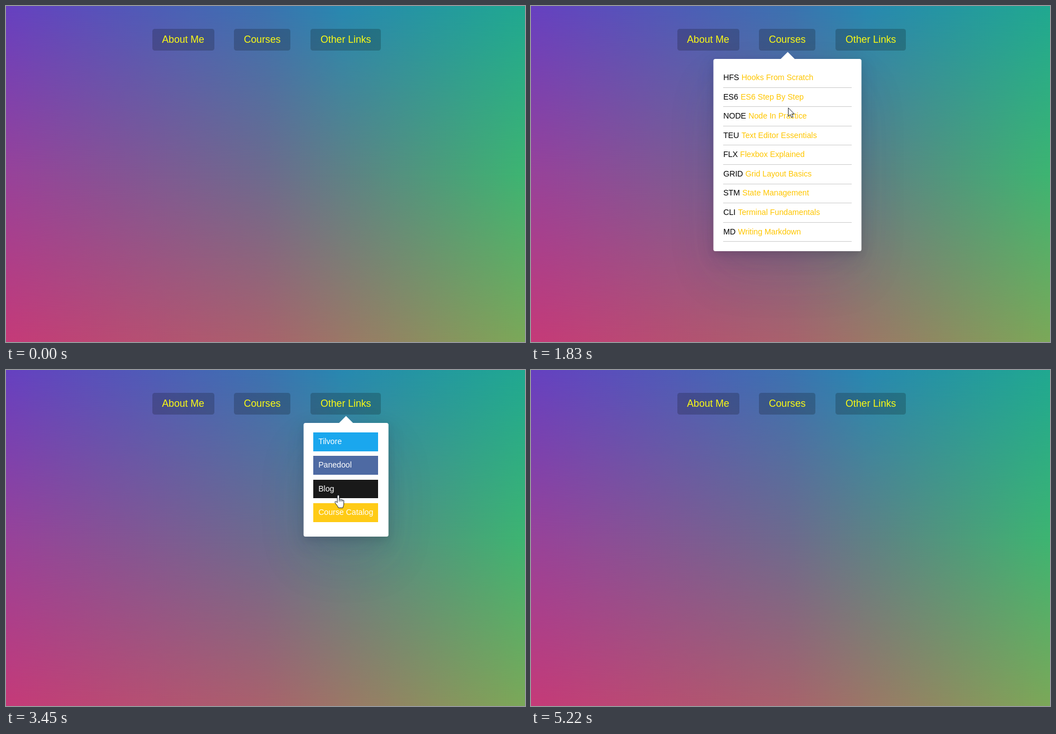
These frames come from a looping animation (929x603 px, 5510 ms). An HTML page:

```html
<!DOCTYPE html>
<html lang="en">
<head>
<meta charset="utf-8">
<title>Follow-along dropdown</title>
<style>
html, body { margin: 0; width: 100%; height: 100%; overflow: hidden; }
#stage {
  position: relative; width: 929px; height: 603px; overflow: hidden;
  font: 14.14px/15.9px "Liberation Sans", Arial, sans-serif;
  background: linear-gradient(90deg, #98429a, #6d6b8e, #3db572);
}
.wash { position: absolute; inset: 0; }
#sky {
  background: linear-gradient(90deg, #6640c0, #3b72b0 50%, #2788b0 65%, #20a890);
  -webkit-mask: linear-gradient(#000, transparent 50%); mask: linear-gradient(#000, transparent 50%);
}
#ground {
  background: linear-gradient(90deg, #c53a78, #a8626c, #7ba858);
  -webkit-mask: linear-gradient(transparent 50%, #000); mask: linear-gradient(transparent 50%, #000);
}
.tab {
  position: absolute; top: 41px; height: 38.5px; line-height: 38.4px; padding: 0 17.7px;
  border-radius: 4.4px; background: rgba(0,0,0,.2); color: #fbfb14;
  font-size: 17.68px; white-space: nowrap;
}
#panel {
  position: absolute; left: 0; top: 94.5px; background: #fff; border-radius: 3.5px;
  box-shadow: 0 44px 88px rgba(50,50,93,.1), 0 13px 31px rgba(50,50,93,.15), 0 4.4px 13px rgba(0,0,0,.1);
}
#panel i {
  position: absolute; left: 50%; top: 0; width: 17.7px; height: 17.7px; background: #fff;
  transform: translate(-50%, -50%) rotate(45deg);
}
.drop { position: absolute; top: 94.5px; padding: 17.7px; box-sizing: border-box; color: #000; }
.bio { display: flex; align-items: center; line-height: 1.7; }
.bio b { flex: none; width: 113px; height: 113px; margin-right: 17.7px; background: #ffc600; }
.bio p { margin: 0; }
.row { padding: 8.84px 0; border-bottom: .9px solid rgba(0,0,0,.2); }
.row span { color: #ffc600; margin-left: .3em; }
.btn { padding: 8.8px; margin-bottom: 8.8px; color: #fff; white-space: nowrap; }
svg { position: absolute; left: 0; top: 0; }
</style>
</head>
<body>
<div id="stage">
  <div class="wash" id="sky"></div>
  <div class="wash" id="ground"></div>
  <div id="panel"><i></i></div>
  <div id="tabs"></div>
  <div class="drop bio"><b></b><p>Tim Orr sure does love web development. He teaches things like JavaScript, CSS and BBQ. Wait. BBQ isn't part of web development. It should be though!</p></div>
  <div class="drop" id="courses"></div>
  <div class="drop" id="links">
    <div class="btn" style="background:#1aa7ee">Tilvore</div>
    <div class="btn" style="background:#4e6aa3">Panedool</div>
    <div class="btn" style="background:#191919">Blog</div>
    <div class="btn" style="background:#ffcb16">Course Catalog</div>
  </div>
  <svg width="929" height="603">
    <g id="cursor" stroke-linejoin="round" stroke="#1c2430" fill="#fff">
      <path id="arrow" d="M.5 .5V15.8L4 12.4 6.4 17.8 8.9 16.7 6.6 11.5H11.3Z"/>
      <g id="hand" transform="translate(-7 0)">
        <path d="M5 14V2.3a1.8 1.8 0 0 1 3.6 0V8.6a1.7 1.7 0 0 1 2.9.4a1.6 1.6 0 0 1 2.8.8a1.4 1.4 0 0 1 2.4 1V16c0 4-1.6 4.4-1.6 7.4H7C6.5 20 1 16 .8 13.2c0-1.8 2.2-1.8 4.2.8Z"/>
        <path d="M8.6 8.6V12M11.5 9V12M14.3 9.8V12" fill="none"/>
      </g>
    </g>
  </svg>
</div>
<script>
const LOOP = 5510, STEP = 52.3, TOP = 94.5;
const $ = id => document.getElementById(id);
const clamp = v => Math.max(0, Math.min(1, v));
const lerp = (a, b, k) => a + (b - a) * k;
const within = (v, a, b) => v >= a && v <= b;

// x and width of the button, w and h of its dropdown
const tabs = [
  { label: "About Me", x: 261.6, width: 111, w: 477.4, h: 158 },
  { label: "Courses", x: 408.1, width: 102, w: 265.2, h: 345.5 },
  { label: "Other Links", x: 545.4, width: 126, w: 151.5, h: 204.5 }
];
tabs.forEach(tab => { tab.left = tab.x + tab.width / 2 - tab.w / 2; });

// mouse path: time, x, y; hovering follows from it
const PATH = [
  [120, 935, 245], [415, 808, 60], [440, 790, -30], [570, 500, -40], [700, 330, 50],
  [1060, 320, 60], [1130, 380, 7], [1248, 442, 35], [1500, 452, 62], [1680, 452, 62],
  [2000, 470, 330], [2170, 593, 150], [2294, 676, 89], [2500, 602, 72], [3000, 602, 72],
  [3445, 595, 224], [3540, 560, 92], [3700, 288, 60], [3916, 385, 60], [3921, 535, 58],
  [4020, 634, 52], [4240, 650, 60], [4330, 355, 62], [4461, 343, 62], [4520, 551, 60],
  [4595, 529, 62], [4690, 370, 64], [4900, 370, 110], [5170, 797, 452], [5215, 870, 640]
];

$("tabs").innerHTML = tabs.map(tab => `<div class="tab" style="left:${tab.x}px">${tab.label}</div>`).join("");

const courses = [
  "HFS Hooks From Scratch", "ES6 ES6 Step By Step", "NODE Node In Practice",
  "TEU Text Editor Essentials", "FLX Flexbox Explained", "GRID Grid Layout Basics",
  "STM State Management", "CLI Terminal Fundamentals", "MD Writing Markdown"
];
$("courses").innerHTML = courses
  .map(c => `<div class="row">${c.replace(/ (.*)/, "<span>$1</span>")}</div>`).join("");

const drops = [...document.querySelectorAll(".drop")];
drops.forEach((el, i) => {
  const { left, w, h } = tabs[i];
  Object.assign(el.style, { left: left + "px", width: w + "px", height: h + "px" });
});

// CSS "ease": cubic-bezier(.25, .1, .25, 1)
function ease(x) {
  if (x <= 0 || x >= 1) return clamp(x);
  const bez = (s, p, q) => 3 * (1 - s) * (1 - s) * s * p + 3 * (1 - s) * s * s * q + s * s * s;
  let lo = 0, hi = 1;
  for (let i = 0; i < 24; i++) {
    const mid = (lo + hi) / 2;
    if (bez(mid, .25, .25) < x) lo = mid; else hi = mid;
  }
  return bez(lo, .1, 1);
}

function mouseAt(t) {
  const i = Math.max(1, PATH.findIndex(p => p[0] > t));
  const [a, b] = t >= PATH[PATH.length - 1][0] ? PATH.slice(-2) : PATH.slice(i - 1, i + 1);
  const k = clamp((t - a[0]) / (b[0] - a[0]));
  return [lerp(a[1], b[1], k), lerp(a[2], b[2], k)];
}

// a tab stays hovered while the mouse is on its button area or its dropdown
function tabUnder(x, y, open) {
  const tab = tabs[open];
  if (within(y, 23, 97)) {
    return tabs.findIndex(o => within(x, o.x - 17.7, o.x + o.width + 17.7));
  }
  return tab && within(y, TOP, TOP + tab.h) && within(x, tab.left, tab.left + tab.w) ? open : -1;
}

const hovers = [];
for (let t = 0, open = -1; t < LOOP; t++) {
  const id = tabUnder(...mouseAt(t), open);
  if (id !== open) hovers.push({ at: t, id });
  open = id;
}

// replays interrupted transitions up to time t
function panelAt(t) {
  const track = (v, dur) => ({ from: v, to: v, start: 0, dur });
  const value = (p, at) => lerp(p.from, p.to, ease((at - p.start) / p.dur));
  const tracks = {
    left: track(tabs[0].left, 200), w: track(tabs[0].w, 300), h: track(tabs[0].h, 300), alpha: track(0, 100)
  };
  let open = -1, since = 0;
  for (const { at, id } of hovers) {
    if (at > t) break;
    open = id;
    since = at;
    const goal = { ...tabs[id], alpha: id < 0 ? 0 : 1 };
    for (const key in tracks) {
      const p = tracks[key];
      if (!(key in goal) || goal[key] === p.to) continue;
      Object.assign(p, { from: value(p, at), to: goal[key], start: at });
    }
  }
  const pose = { open, shown: ease((t - since - 150) / 200) };
  for (const key in tracks) pose[key] = value(tracks[key], t);
  return pose;
}

function overLink(x, y, open) {
  if (within(y, 41, 79.5)) return tabs.some(o => within(x, o.x, o.x + o.width));
  const rowY = y - TOP - 17.7;
  if (open === 2) return within(x, 550.5, 666.5) && within(rowY, 0, 160) && rowY % 42.4 < 33.6;
  return open === 1 && within(x, 380, 520) && within(rowY, 0, 310) && within(rowY % 34.5, 9, 25);
}

function draw(time) {
  const t = 150 + Math.floor((time - 144) / STEP) * STEP;
  const pose = panelAt(t);
  Object.assign($("panel").style, {
    transform: `translateX(${pose.left}px)`, width: pose.w + "px", height: pose.h + "px", opacity: pose.alpha
  });
  drops.forEach((el, i) => { el.style.opacity = i === pose.open ? pose.shown : 0; });

  const [x, y] = mouseAt(t);
  const hand = overLink(x, y, pose.open);
  $("cursor").setAttribute("transform", `translate(${x.toFixed(1)} ${y.toFixed(1)})`);
  $("hand").style.display = hand ? "" : "none";
  $("arrow").style.display = hand ? "none" : "";
}

const began = performance.now();
function tick() {
  draw((performance.now() - began) % LOOP);
  requestAnimationFrame(tick);
}
tick();
</script>
</body>
</html>
```
